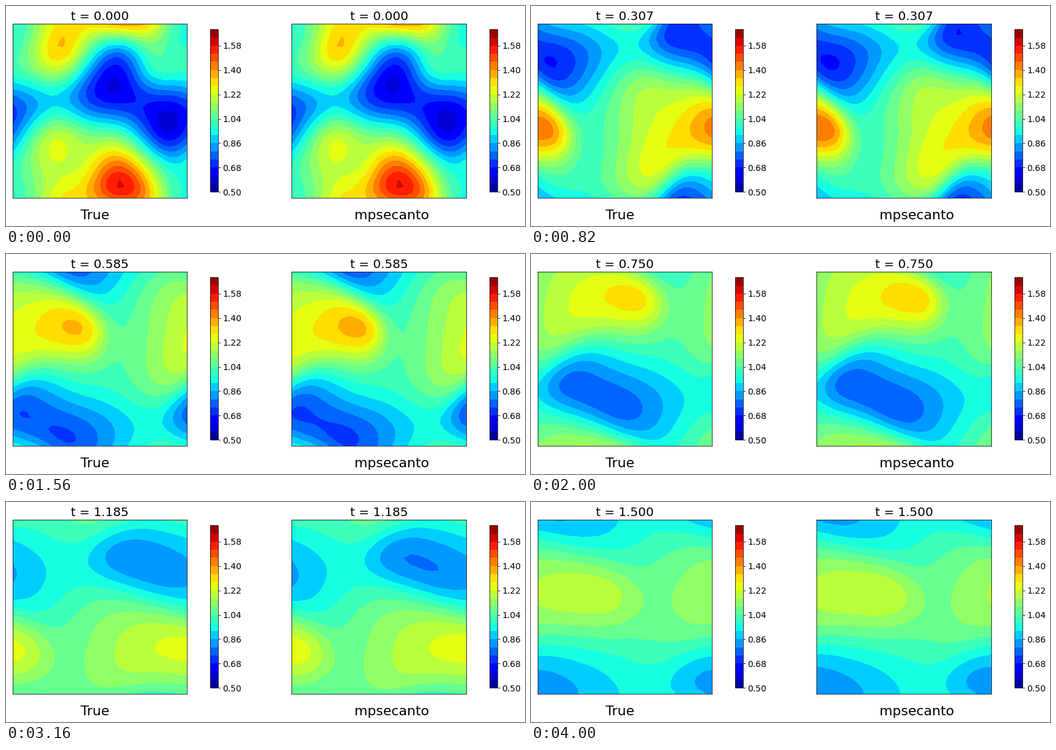
Recreate the animation shown at these times as a matplotlib script. Size 849 px wide and 360 px high, loop 4020 ms.

```python
import numpy as np
import matplotlib.pyplot as plt
from matplotlib.animation import FuncAnimation

W, H = 849, 360
N, STEPS, DT, SUB = 32, 201, 0.0075, 3
DRIFT, MEAN = 1.0, 1.03
LEFT, BOTTOM, SIDE, OFFSET = 10.6, 46.1, 285.35, 456.8
LEVELS = np.linspace(0.5, 1.7, 21)

# Key points on the first state's contours: {contour step: x, y, x, y, ...}
MARKS = {
    1.6: (268, 185),
    1.8: (171, 130),
    3: (146, 128, 171, 97, 200, 115, 213, 152, 264, 222, 264, 154),
    4: (160, 168, 222, 192),
    6: (42, 182, 121, 122, 165, 72, 262, 246, 296, 133),
    8: (14, 40, 98, 125, 11, 112, 11, 258, 150, 198, 240, 103, 262, 262,
        284, 290),
    9: (28, 60, 28, 285, 78, 188, 262, 60),
    10: (257, 290),
    11: (55, 255, 72, 208, 130, 226),
    12: (61, 55, 84, 288, 125, 262, 215, 43),
    14: (84, 72, 232, 290, 186, 246, 231, 29),
    17: (164, 293, 209, 293, 187, 272),
    18.3: (187, 293),
}

wave = 2 * np.pi * np.fft.fftfreq(N, 1 / N)
KX, KY = np.meshgrid(wave, wave)
KEEP = np.maximum(abs(KX), abs(KY)) < 2 * np.pi * N / 3


def kernel(ax, ay, bx, by, size=0.17):
    """Periodic Gaussian similarity of two point sets."""
    dx = 2 * np.pi * (ax[:, None] - bx)
    dy = 2 * np.pi * (ay[:, None] - by)
    return np.exp((np.cos(dx) + np.cos(dy) - 2) / (2 * np.pi * size) ** 2)


def first_state(noise=0.07):
    """Smooth periodic surface through the key points."""
    x, y, value = np.array([
        (px, py, 0.5 + 0.06 * s)
        for s, c in MARKS.items() for px, py in zip(c[::2], c[1::2])]).T
    period = SIDE * N / (N - 1)
    x, y = (x - LEFT) / period, (H - BOTTOM - y) / period
    gram = kernel(x, y, x, y) + noise**2 * np.eye(len(x))
    gx, gy = np.meshgrid(np.arange(N) / N, np.arange(N) / N)
    fit = kernel(gx.ravel(), gy.ravel(), x, y)
    return MEAN + (fit @ np.linalg.solve(gram, value - MEAN)).reshape(N, N)


def evolve(u, nu):
    """Viscous Burgers flow along x, carried upwards by a steady drift."""
    linear = 1j * DRIFT * KY + nu * (KX**2 + KY**2)

    def rate(h):
        flux = np.fft.fft2(np.fft.ifft2(h).real ** 2 / 2) * KEEP
        return -1j * KX * flux - linear * h

    path, h, d = [u], np.fft.fft2(u), DT / SUB
    for _ in range(STEPS - 1):
        for _ in range(SUB):
            a = rate(h)
            b = rate(h + d / 2 * a)
            c = rate(h + d / 2 * b)
            e = rate(h + d * c)
            h = h + d / 6 * (a + 2 * b + 2 * c + e)
        path.append(np.fft.ifft2(h).real)
    return path


plt.rcParams["font.family"] = "DejaVu Sans"
fig = plt.figure(figsize=(W / 72, H / 72), dpi=72, facecolor="white")
nodes = np.linspace(0, 1, N)


def place(x, y, w, h):
    return fig.add_axes([x / W, y / H, w / W, h / H])


def paint(ax, u):
    u = np.clip(u, 0.501, 1.699)
    return ax.contourf(nodes, nodes, u, levels=LEVELS, cmap="jet")


panels = []
start = first_state()
# The learned model damps the flow slightly less than the true one.
for i, (nu, name, name_x) in enumerate(((0.01, "True", 122),
                                        (0.009, "mpsecanto", 570))):
    path = evolve(start, nu)
    x = LEFT + OFFSET * i
    ax = place(x, BOTTOM, SIDE, SIDE)
    ax.set(xticks=[], yticks=[], xlim=(0, 1), ylim=(0, 1))
    fill = paint(ax, path[0])
    bar = fig.colorbar(fill, cax=place(x + 323.5, 55.8, 13.3, 266),
                       ticks=LEVELS[::3], format="%.2f")
    bar.ax.tick_params(labelsize=14)
    title = ax.set_title("", fontsize=20)
    fig.text(name_x / W, 1 - 349 / H, name, fontsize=22)
    panels.append([ax, path, title, fill])


def draw(i):
    for panel in panels:
        ax, path, title, fill = panel
        fill.remove()
        panel[3] = paint(ax, path[i])
        title.set_text(f"t = {i * DT:.3f}")


anim = FuncAnimation(fig, draw, frames=STEPS, interval=20, repeat=True,
                     repeat_delay=0)
plt.show()
```
